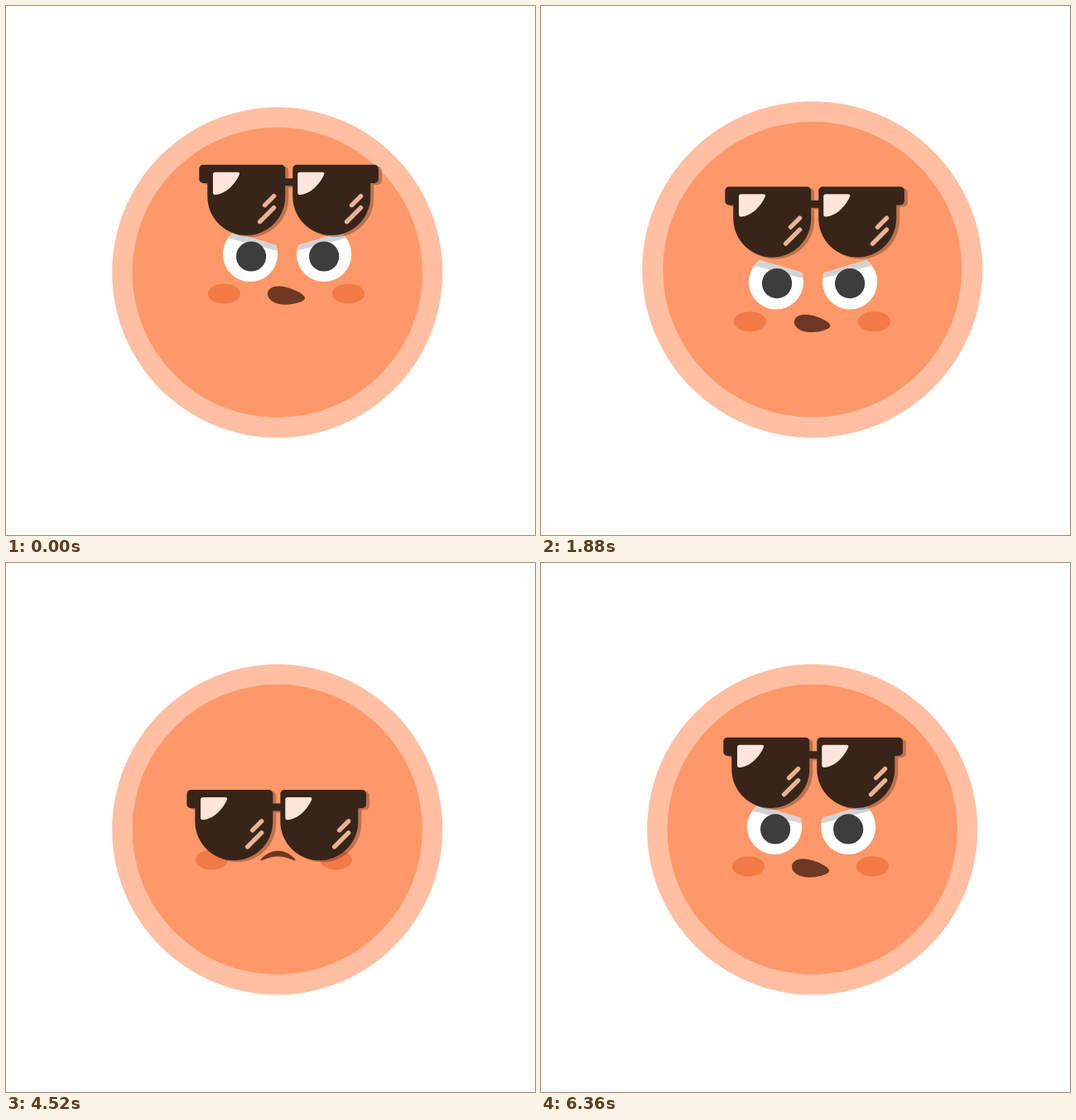
An HTML page with a canvas that plays this animation: 639x639 px, repeating every 6400 ms.

```html
<!DOCTYPE html>
<html lang="en">
<head>
<meta charset="utf-8">
<title>Sunglasses face</title>
<style>
  html, body { margin: 0; width: 100%; height: 100%; overflow: hidden; background: #fff; }
  canvas { display: block; width: 100vmin; height: 100vmin; }
</style>
</head>
<body>
<canvas width="639" height="639"></canvas>
<script>
const ctx = document.querySelector('canvas').getContext('2d');
const LOOP = 6400, STEP = 40, TAU = Math.PI * 2;

// Turning points [ms, value] of the left cheek; every other feature hangs on it.
const SWAY = [[0, 263.5], [710, 240.8], [1440, 254.7], [2760, 246],
  [3880, 261.5], [4760, 245.7], [5400, 253.1], [6160, 250.5]];
const BOB = [[0, 347.5], [850, 363], [1310, 365], [2740, 411],
  [3860, 400.5], [4300, 359], [5420, 354.4], [6700, 369]];

// Centre and radii, plus how far the outline tilts, narrows to the right and arches.
const CROOKED = { x: 75, y: 2.7, rx: 22.5, ry: 10.5, tilt: 2.5, taper: 1.5, arch: 0 };
const OVAL = { x: 77, y: 4, rx: 16.2, ry: 7.2, tilt: 0, taper: 0, arch: 0 };
const FROWN = { x: 80, y: -7.5, rx: 21, ry: 3.4, tilt: 0, taper: 0, arch: 8 };

const frame = new Path2D();
for (const [lens, tab] of [[10, 0], [113, 196.7]]) {
  frame.roundRect(lens, 0, 94, 85.3, [5, 5, 47, 47]);
  frame.roundRect(tab, 0, 20, 22.3, 5);
}
frame.rect(102, 16.5, 13, 9);

const shine = new Path2D('M19.5 9H46.5Q50 9 48.3 12.5C43 24 32 35.5 19.5 36.3Q16.7 36.3 16.7 33.5V11.8Q16.7 9 19.5 9Z');
const streaks = new Path2D('M79.3 49L90.3 38M73.3 69L90.3 52');

function ease(t, from, to) {
  const u = Math.min(1, Math.max(0, (t - from) / (to - from)));
  return u * u * (3 - 2 * u);
}

const pulse = (t, a, b, c, d) => ease(t, a, b) - ease(t, c, d);
const mix = (a, b, k) => a + (b - a) * k;

// Eases from each turning point to the next.
function follow(keys, t) {
  return keys.reduce((v, [end, to], i) => i ? mix(v, to, ease(t, keys[i - 1][0], end)) : to, 0);
}

function morph(a, b, k) {
  return Object.fromEntries(Object.keys(a).map(key => [key, mix(a[key], b[key], k)]));
}

function oval(x, y, rx, ry, color) {
  ctx.fillStyle = color;
  ctx.beginPath();
  ctx.ellipse(x, y, rx, ry, 0, 0, TAU);
  ctx.fill();
}

// Fills from a slanted line down to a second one.
function band(color, left, right, left2, right2) {
  ctx.fillStyle = color;
  ctx.beginPath();
  ctx.moveTo(-36, left);
  ctx.lineTo(36, right);
  ctx.lineTo(36, right2);
  ctx.lineTo(-36, left2);
  ctx.fill();
}

function drawBody(stretch) {
  ctx.save();
  ctx.translate(327.8, 521.5);
  ctx.scale(1 + 0.05 * stretch, 1 + 0.03 * stretch);
  oval(0, -199.6, 199.6, 199.6, '#ffbfa3');
  oval(0, -199.6, 175.3, 175.3, '#ff9868');
  ctx.restore();
}

function drawEye(x, side, stretch) {
  ctx.save();
  ctx.translate(x, -47.5 - 0.5 * stretch);
  ctx.save();
  ctx.scale(side, 1);
  ctx.beginPath();
  ctx.arc(0, 0, 33.1, 0, TAU);
  ctx.clip();
  band('#fff', -31.3, -9.7, 36, 36);
  band('#d3d3d3', -31.3, -9.7, -22, -3.5);
  ctx.restore();
  oval(0.5 + 0.5 * side, 2.5 - 1.2 * stretch, 18.1, 18.1, '#3d3d3d');
  ctx.restore();
}

function drawMouth({ x, y, rx, ry, tilt, taper, arch }) {
  ctx.fillStyle = '#6c3823';
  ctx.beginPath();
  for (let a = 0; a < TAU; a += TAU / 72) {
    const c = Math.cos(a), s = Math.sin(a);
    ctx.lineTo(x + rx * c, y + ry * s + tilt * c - 2 * taper * s * c + arch * c * c);
  }
  ctx.fill();
}

function drawGlasses(y) {
  ctx.save();
  ctx.translate(-30.2, y);
  ctx.translate(4, 2);
  ctx.fillStyle = 'rgba(56, 37, 26, 0.33)';
  ctx.fill(frame);
  ctx.translate(-4, -2);
  ctx.fillStyle = '#38251a';
  ctx.fill(frame);

  ctx.fillStyle = '#ffe6dc';
  ctx.strokeStyle = '#eab393';
  ctx.lineWidth = 5.4;
  ctx.lineCap = 'round';
  for (const right of [0, 1]) {
    ctx.save();
    ctx.translate(102.3 * right, 0);
    ctx.fill(shine);
    ctx.translate(2.7 * right, 0);
    ctx.stroke(streaks);
    ctx.restore();
  }
  ctx.restore();
}

function draw(t) {
  const stretch = pulse(t, 1576, 2113, 3840, 4140);
  const lift = pulse(t, 1600, 2220, 3840, 4140);
  const drop = pulse(t, 3840, 4140, 5560, 5760);
  const small = pulse(t, 1790, 2240, 3300, 3700);
  const frown = pulse(t, 3900, 4140, 5560, 5760);

  ctx.fillStyle = '#fff';
  ctx.fillRect(0, 0, 639, 639);
  drawBody(stretch);

  ctx.save();
  ctx.translate(follow(SWAY, t), follow(BOB, t));
  for (const x of [0, 150]) oval(x, 0, 19.6, 12.1, '#f17a45');
  drawEye(31.6, 1, stretch);
  drawEye(120.7, -1, stretch);
  drawMouth(morph(morph(CROOKED, OVAL, small), FROWN, frown));
  drawGlasses(-155.8 - 16.6 * lift + 71.2 * drop);
  ctx.restore();
}

const start = performance.now();
function tick() {
  const t = (performance.now() - start) % LOOP;
  draw(Math.floor(t / STEP) * STEP);
  requestAnimationFrame(tick);
}
tick();
</script>
</body>
</html>
```
